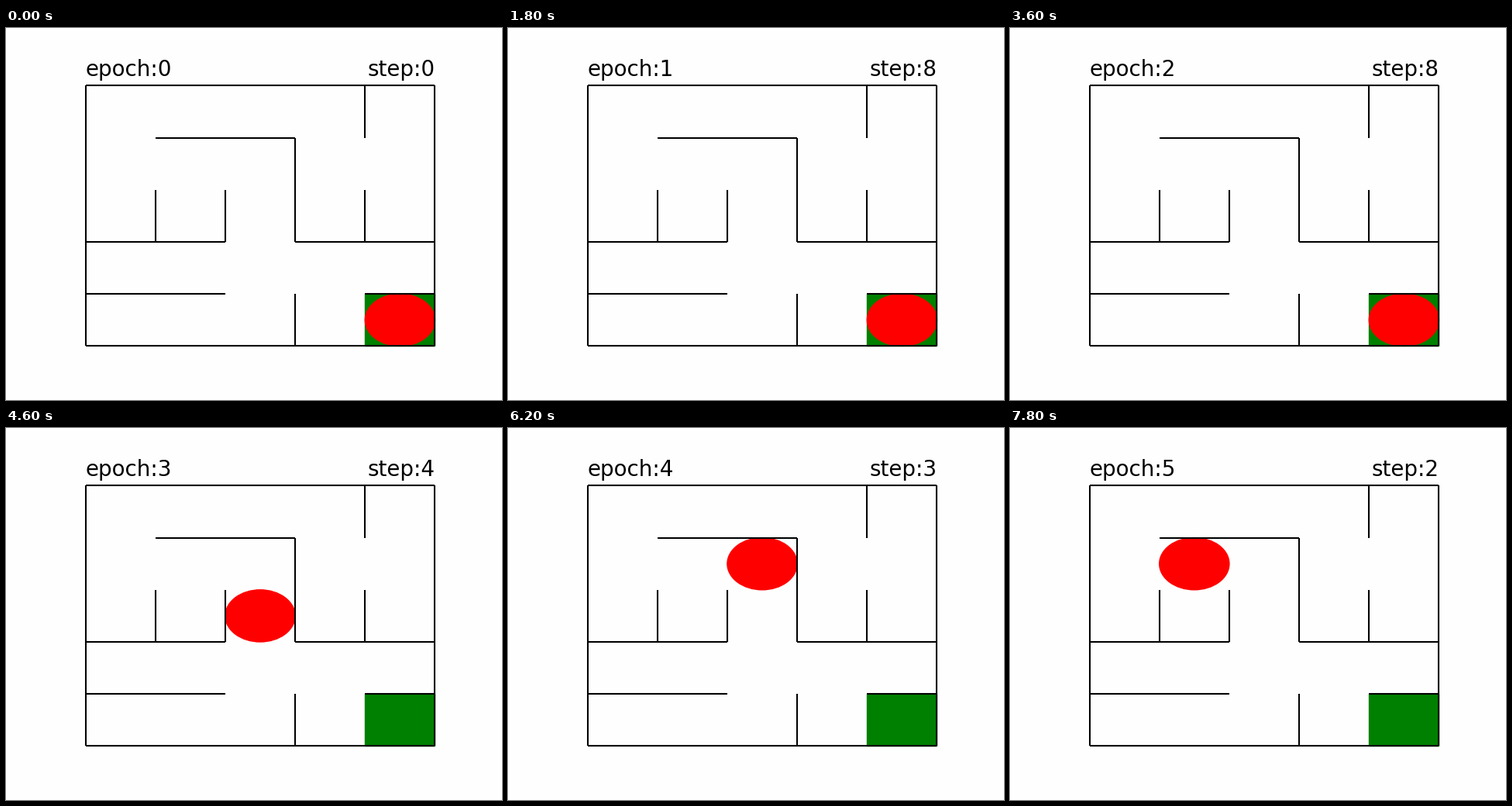
Recreate the animation shown at these times as a matplotlib script. Size 640x480 px, loop 8000 ms.

```python
from itertools import groupby

import matplotlib.pyplot as plt
from matplotlib.animation import FuncAnimation
from matplotlib.patches import Ellipse, Rectangle

SIZE = 5
FRAMES = 40
INTERVAL = 200
MOVES = {"U": (0, 1), "D": (0, -1), "L": (-1, 0), "R": (1, 0)}
ROUTE = "DRRDDRDR"  # start corner to goal, one letter per step
STEPS = len(ROUTE) + 1
TEXT_Y = SIZE + 0.185

plt.rcParams["font.family"] = "DejaVu Sans"
fig = plt.figure(figsize=(6.4, 4.8), dpi=100, facecolor="#fefefe")
ax = fig.add_axes([0.125, 0.11, 0.775, 0.77])
ax.set_xlim(-0.25, SIZE + 0.25)
ax.set_ylim(-0.25, SIZE + 0.25)
ax.axis("off")


def walk(x, y, moves):
    """Point reached from (x, y) after the lettered moves."""
    for m in moves:
        dx, dy = MOVES[m]
        x, y = x + dx, y + dy
    return x, y


def wall(x, y, moves):
    """Draw a wall from (x, y), one line per straight run."""
    for _, run in groupby(moves):
        nx, ny = walk(x, y, run)
        ax.plot([x, nx], [y, ny], color="black", lw=1.5,
                solid_capstyle="butt")
        x, y = nx, ny


wall(0, SIZE, "".join(m * SIZE for m in "RDLU"))
wall(1, 4, "RRDDRR")
wall(0, 2, "RRU")
wall(0, 1, "RR")
wall(4, 1, "R")
for x, y in [(4, 5), (4, 3), (1, 3), (3, 1)]:
    wall(x, y, "D")

ax.add_patch(Rectangle((SIZE - 1, 0), 1, 1, color="green", lw=1))
agent = ax.add_patch(Ellipse((0, 0), 1, 1, color="red", lw=1))
epoch_text = ax.text(0, TEXT_Y, "", fontsize=20, ha="left")
step_text = ax.text(SIZE, TEXT_Y, "", fontsize=20, ha="right")


def update(i):
    # The run opens with the agent resting on the goal
    epoch, pos = divmod(i + STEPS - 1, STEPS)
    step = pos if epoch else 0
    agent.set_center(walk(0.5, SIZE - 0.5, ROUTE[:pos]))
    epoch_text.set_text(f"epoch:{epoch}")
    step_text.set_text(f"step:{step}")
    return agent, epoch_text, step_text


anim = FuncAnimation(fig, update, frames=FRAMES, interval=INTERVAL,
                     init_func=lambda: update(0), repeat=True, repeat_delay=0)
plt.show()
```
